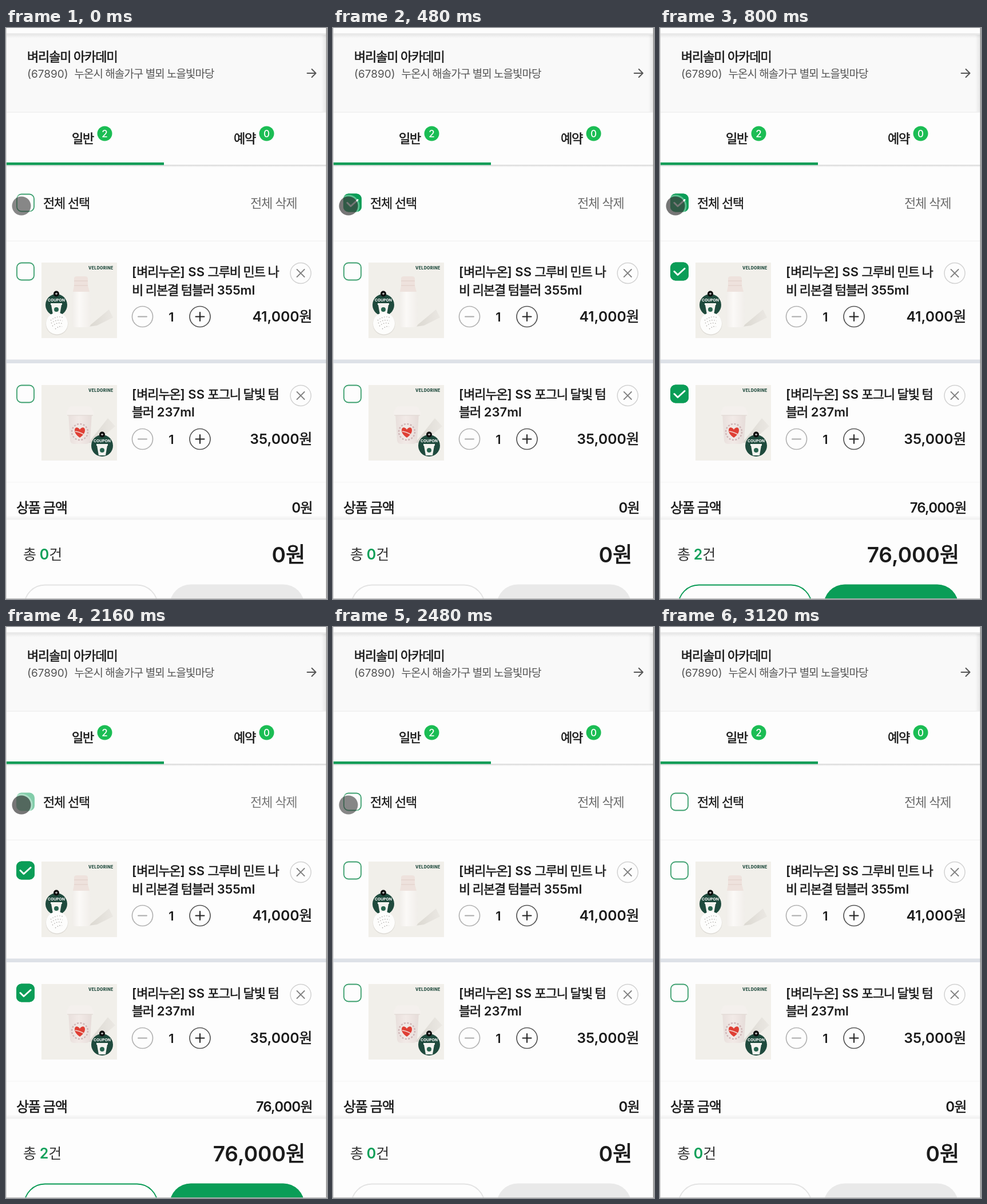
Animation, 561 px wide and 998 px high, one loop 3.2 s. Source, as an HTML page:

```html
<!DOCTYPE html>
<html lang="ko">
<head>
<meta charset="utf-8">
<title>장바구니</title>
<style>
html, body { margin: 0; width: 100%; height: 100%; overflow: hidden; background: #fdfdfd; }
svg { display: block; }
text {
  font: 500 22px Inter, "Noto Sans CJK KR", "Noto Sans CJK JP", sans-serif;
  color: #1b1b1b; fill: currentColor; white-space: pre;
}
.ko { letter-spacing: -.052em; stroke: currentColor; stroke-width: .35px; }
.semi { font-weight: 600; }
.semi .ko { font-weight: 500; stroke-width: .6px; }
.thin, .thin .ko { font-weight: 400; stroke: none; }
.end { text-anchor: end; }
.mid { text-anchor: middle; }
.address { font-size: 19px; color: #555; }
.price { font-size: 24.7px; }
.sum { font-size: 24px; letter-spacing: -.035em; }
.total { font-size: 37px; }
.total .ko { stroke-width: 1px; }
.count { font-size: 25px; color: #333; }
.num { font-weight: 600; color: #12a05a; fill: currentColor; }
.badge { font-size: 17px; color: #fff; }
.brand { font-size: 7px; font-weight: 800; letter-spacing: .05em; color: #1f4a3d; }
.coupon { font-size: 6.8px; font-weight: 700; color: #fff; }
.line { fill: none; stroke-linecap: round; stroke-linejoin: round; }

/* one 3.2 s loop, hard steps only */
.all, .all-rim, .all-tick, .item, .item-tick, .on, .off, .tap, .dot, .del {
  animation: 3.2s step-end infinite;
}
.all { animation-name: all; }
.all-rim { animation-name: all-rim; }
.all-tick { animation-name: all-tick; }
.item { animation-name: item; }
.item-tick { animation-name: item-tick; }
.on { animation-name: on; }
.off { animation-name: off; }
.tap { animation-name: tap; }
.dot { animation-name: dot; }
.del { animation-name: del; }
@keyframes all { 0% { opacity: 0 } 12.5% { opacity: .38 } 15% { opacity: 1 } 67.5% { opacity: .5 } 70%, 100% { opacity: 0 } }
@keyframes all-rim { 0% { opacity: 1 } 12.5% { opacity: .15 } 15% { opacity: 1 } 67.5% { opacity: 0 } 70%, 100% { opacity: 1 } }
@keyframes all-tick { 0% { opacity: 0 } 15% { opacity: 1 } 67.5%, 100% { opacity: 0 } }
@keyframes item { 0% { opacity: 0 } 22.5% { opacity: .7 } 25% { opacity: 1 } 75% { opacity: .4 } 77.5%, 100% { opacity: 0 } }
@keyframes item-tick { 0% { opacity: 0 } 22.5% { opacity: 1; stroke: #9f9f9f } 25% { opacity: 1; stroke: #fff } 75%, 100% { opacity: 0 } }
@keyframes on { 0% { opacity: 0 } 22.5% { opacity: 1 } 75%, 100% { opacity: 0 } }
@keyframes off { 0% { opacity: 1 } 22.5% { opacity: 0 } 75%, 100% { opacity: 1 } }
@keyframes tap { 0% { opacity: 1 } 95% { opacity: .5 } 97.5%, 100% { opacity: 0 } }
@keyframes dot { 0% { opacity: .62 } 12.5% { opacity: .72 } 70%, 100% { opacity: .62 } }
@keyframes del { 0% { color: #6b6b6b } 12.5% { color: #999 } 15% { color: #6b6b6b } 67.5% { color: #777 } 70%, 100% { color: #6b6b6b } }
</style>
</head>
<body>
<svg width="561" height="998" viewBox="0 0 561 998">
  <defs>
    <linearGradient id="fall" x2="0" y2="1">
      <stop stop-color="#000" stop-opacity=".09"/><stop offset="1" stop-color="#000" stop-opacity="0"/>
    </linearGradient>
    <linearGradient id="rise" x2="0" y2="1">
      <stop stop-color="#000" stop-opacity="0"/><stop offset="1" stop-color="#000" stop-opacity=".06"/>
    </linearGradient>
    <linearGradient id="side">
      <stop stop-color="#000" stop-opacity="0"/><stop offset="1" stop-color="#000" stop-opacity=".07"/>
    </linearGradient>
    <linearGradient id="bottle">
      <stop stop-color="#f0ede9"/><stop offset=".4" stop-color="#fbf9f7"/><stop offset="1" stop-color="#f1eeea"/>
    </linearGradient>
    <linearGradient id="cup">
      <stop stop-color="#e8dfdc"/><stop offset=".45" stop-color="#f2eae7"/><stop offset="1" stop-color="#e6dcd9"/>
    </linearGradient>
    <linearGradient id="shade">
      <stop stop-color="#dad7d0"/><stop offset="1" stop-color="#ebe8e3"/>
    </linearGradient>
    <rect id="box" x="19" y=".5" width="30" height="30" rx="8"/>
    <path id="tick" class="line" d="M25 15.500l6 6 12-11" stroke-width="3"/>
    <g id="controls" class="line">
      <circle cx="515" cy="18.500" r="18" stroke="#d2d2d2" stroke-width="1.500"/>
      <path d="M508.500 12l13 13m0-13l-13 13" stroke="#808080" stroke-width="1.800"/>
      <circle cx="238.500" cy="94.500" r="18" stroke="#b3b3b3" stroke-width="1.700"/>
      <path d="M231 94.500h15" stroke="#aaa" stroke-width="1.900"/>
      <circle cx="339" cy="94.500" r="18" stroke="#555" stroke-width="1.700"/>
      <path d="M331.500 94.500h15m-7.500-7.500v15" stroke="#222" stroke-width="2"/>
    </g>
    <g id="coupon">
      <circle r="19" fill="#1f4a3d"/>
      <path d="M-10-3H10V0H9L6 17H-6L-9 0H-10z" fill="#f3f3ef"/>
      <circle cy="8" r="4" fill="#28644f"/>
      <circle cy="-19.500" r="5" fill="#0b0b0b"/>
      <path d="M-2-19.500h4m-2-2v4" stroke="#fff" stroke-width=".9"/>
    </g>
  </defs>

  <rect width="561" height="998" fill="#fdfdfd"/>

  <!-- address -->
  <rect y="12" width="561" height="135" fill="#f9f9f9"/>
  <rect y="9.500" width="561" height="8" fill="url(#fall)"/>
  <rect y="9.500" width="561" height="3" fill="#e9e9e9"/>
  <rect x="551" y="12" width="8" height="135" fill="url(#side)"/>
  <rect y="146.500" width="561" height="1.500" fill="#f0f0f0"/>
  <text x="37" y="58" class="semi">벼리솔미 아카데미</text>
  <text x="37" y="86.500" class="address thin">(67890)</text>
  <text x="119.500" y="86.500" class="address thin">누온시 해솔가구 별뫼 노을빛마당</text>
  <path class="line" d="M526.500 79h15m-7-7l7 7-7 7" stroke="#555" stroke-width="2"/>

  <!-- tabs -->
  <rect y="239" width="561" height="1.500" fill="#dcdcdc"/>
  <rect y="240.500" width="561" height="3" fill="url(#fall)"/>
  <rect y="235" width="276" height="4.500" fill="#0d9d57"/>
  <text x="115" y="201" class="semi">일반</text>
  <text x="398" y="201" class="semi">예약</text>
  <g fill="#1bbd54">
    <circle cx="172.500" cy="184.500" r="13"/>
    <circle cx="455.500" cy="184.500" r="13"/>
  </g>
  <text x="172.500" y="190.500" class="badge mid">2</text>
  <text x="455.500" y="190.500" class="badge mid">0</text>

  <!-- select all -->
  <text x="65" y="313.500">전체 선택</text>
  <text x="427" y="313.500" class="thin del">전체 삭제</text>
  <rect y="371.500" width="561" height="1.500" fill="#f3f3f3"/>
  <g transform="translate(0 290)">
    <g class="all-rim"><use href="#box" fill="none" stroke="#3c9f6e" stroke-width="1.800"/></g>
    <g class="all"><use href="#box" fill="#0a9d57" stroke="#0a9d57" stroke-width="2"/></g>
    <g class="all-tick" stroke="#fff"><use href="#tick"/></g>
  </g>

  <!-- first product -->
  <g transform="translate(0 410)">
    <use href="#box" fill="none" stroke="#3c9f6e" stroke-width="1.800"/>
    <g class="item"><use href="#box" fill="#0a9d57" stroke="#0a9d57" stroke-width="2"/></g>
    <g class="item-tick" stroke="#fff"><use href="#tick"/></g>
    <rect x="62" width="132" height="132" fill="#f1efea"/>
    <path d="M144 112l36-30 7 14-28 14z" fill="url(#shade)"/>
    <path d="M119 48Q115 53 115 61V107Q115 113 122 113H141Q148 113 148 107V61Q148 53 144 48z" fill="url(#bottle)"/>
    <path d="M119 28Q119 24 124 24H138Q143 24 143 28V40L146 51H117L119 40z" fill="#eee2dd"/>
    <path d="M119 32h24M119 40h24" stroke="#dfcdc7"/>
    <use href="#coupon" x="88" y="74"/>
    <text x="88" y="67.500" class="coupon mid">COUPON</text>
    <circle cx="89" cy="107.500" r="19.500" fill="#dedbd6"/>
    <circle cx="89" cy="106.500" r="19" fill="#fdfdfc"/>
    <path d="M78 101q12-9 21-5m-20 10q10-8 20-4m-18 9q9-8 18-4m-13 9q8-6 12-4" fill="none" stroke="#9a9692" stroke-width="1.200" stroke-dasharray="1.200 3"/>
    <text x="187.500" y="12" class="brand end">VELDORINE</text>
    <text x="220" y="24" class="semi">[벼리누온] SS 그루비 민트 나</text>
    <text x="220" y="55.500" class="semi">비 리본결 텀블러 355ml</text>
    <use href="#controls"/>
    <text x="289" y="102.500" class="semi mid">1</text>
    <text x="534" y="103" class="price semi end">41,000원</text>
  </g>
  <rect y="579.500" width="561" height="6.500" fill="#dde1e7"/>

  <!-- second product -->
  <g transform="translate(0 624)">
    <use href="#box" fill="none" stroke="#3c9f6e" stroke-width="1.800"/>
    <g class="item"><use href="#box" fill="#0a9d57" stroke="#0a9d57" stroke-width="2"/></g>
    <g class="item-tick" stroke="#fff"><use href="#tick"/></g>
    <rect x="62" width="132" height="132" fill="#f1efea"/>
    <path d="M144 101l34-43 13 14-34 29z" fill="url(#shade)"/>
    <path d="M109 50H150L147 97Q146 103 139 103H120Q113 103 112 97z" fill="url(#cup)"/>
    <path d="M109 42Q110 37 117 37H142Q149 37 150 42L153 47V53H106V47z" fill="#f4f0ed"/>
    <path d="M107 53h45" stroke="#ddd5d0"/>
    <circle cx="129" cy="82" r="14" fill="none" stroke="#cfb5b6" stroke-width="2.500" stroke-dasharray="3 2.500"/>
    <path d="M129 92C122 87 120 83 120 79C120 73 126 73 129 78C132 73 138 73 138 79C138 83 136 87 129 92z" fill="#df3f35"/>
    <path d="M121 81q8 1 16 6" stroke="#f3d5cf" stroke-width="1.500" fill="none"/>
    <use href="#coupon" x="168" y="106"/>
    <text x="168" y="99.500" class="coupon mid">COUPON</text>
    <text x="187.500" y="12" class="brand end">VELDORINE</text>
    <text x="220" y="23.500" class="semi">[벼리누온] SS 포그니 달빛 텀</text>
    <text x="220" y="55" class="semi">블러 237ml</text>
    <use href="#controls"/>
    <text x="289" y="102.500" class="semi mid">1</text>
    <text x="534" y="103" class="price semi end">35,000원</text>
  </g>
  <rect y="793" width="561" height="1.500" fill="#f7f7f7"/>

  <!-- amount -->
  <text x="18" y="846.500" class="sum semi">상품 금액</text>
  <text x="535" y="846.500" class="sum semi end off">0원</text>
  <text x="535" y="846.500" class="sum semi end on">76,000원</text>

  <!-- order bar -->
  <rect y="852" width="561" height="8" fill="url(#rise)"/>
  <rect y="859.500" width="561" height="139" fill="#fdfdfd"/>
  <text x="30" y="929" class="count thin off">총 <tspan class="num">0</tspan>건</text>
  <text x="30" y="929" class="count thin on">총 <tspan class="num">2</tspan>건</text>
  <text x="521" y="933.500" class="total semi end off">0원</text>
  <text x="521" y="933.500" class="total semi end on">76,000원</text>
  <rect x="32" y="973.500" width="233" height="72" rx="36" fill="none" stroke="#e3e3e3" stroke-width="1.800"/>
  <rect x="286" y="972.500" width="235.500" height="74" rx="37" fill="#e9e9e9"/>
  <g class="item">
    <rect x="32" y="973.500" width="233" height="72" rx="36" fill="none" stroke="#0a9d57" stroke-width="1.800"/>
    <rect x="286" y="972.500" width="235.500" height="74" rx="37" fill="#0a9d57"/>
  </g>

  <!-- screen edges -->
  <rect width="1" height="998" fill="#cfcfcf"/>
  <rect x="559.500" width="1.500" height="998" fill="#8c8c8c"/>
  <rect y="997" width="561" height="1" fill="#b5b5b5"/>

  <!-- touch point -->
  <g class="tap">
    <circle cx="27" cy="311" r="18" fill="none" stroke="#fff" stroke-opacity=".35" stroke-width="3"/>
    <circle class="dot" cx="27" cy="311" r="16.500" fill="#404040"/>
  </g>
</svg>
<script>
// Hangul is set a little tighter than Latin letters and digits.
const hangul = /[가-힣](?:[가-힣 ]*[가-힣])?/g;
for (const el of document.querySelectorAll("text"))
  el.innerHTML = el.innerHTML.replace(hangul, '<tspan class="ko">$&</tspan>');
</script>
</body>
</html>
```
